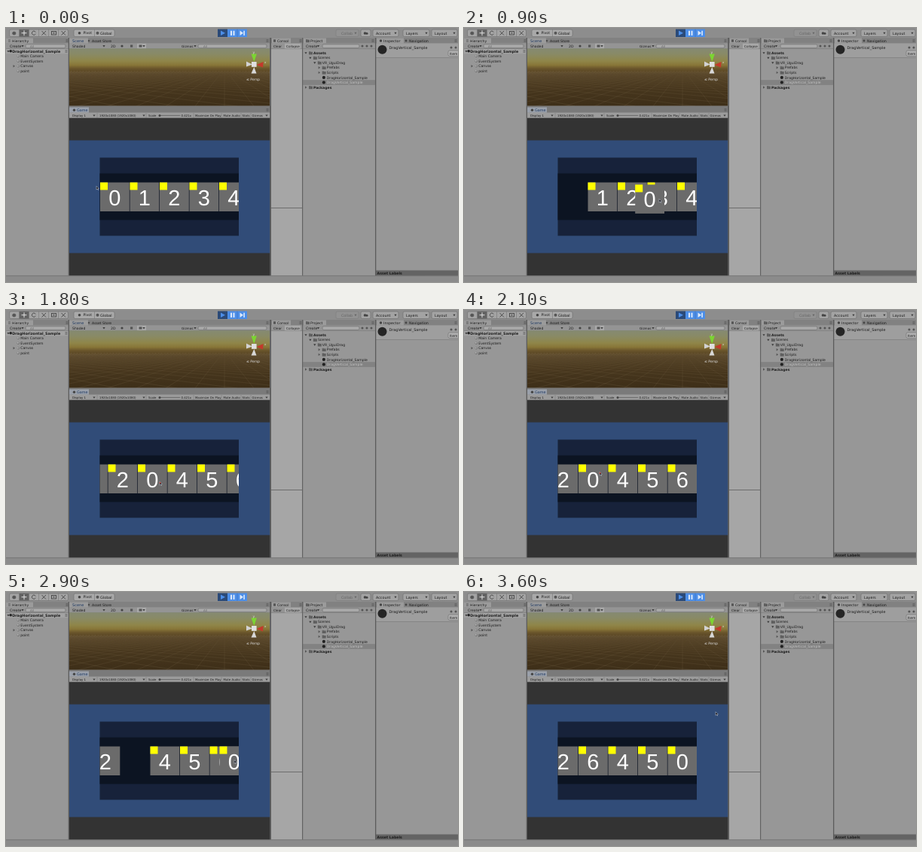
An HTML page with a canvas for the animation above (3700 ms loop, 600 by 338 pixels).

```html
<!DOCTYPE html>
<html lang="en">
<head>
<meta charset="utf-8">
<title>Drag and swap list</title>
<style>
html, body { margin: 0; width: 100%; height: 100%; overflow: hidden; background: #979797; }
canvas { display: block; }
</style>
</head>
<body>
<canvas id="stage" width="600" height="338"></canvas>
<script>
const ctx = document.getElementById('stage').getContext('2d');
const LOOP = 3700, STEP = 100;
const PITCH = 39.5, LEFT = 125, TOP = 205.5;
const INK = '#1c1c1c';

function box(x, y, w, h, color) {
  ctx.fillStyle = color;
  ctx.fillRect(x, y, w, h);
}

function text(s, x, y, { size = 4.6, bold = false, color = INK } = {}) {
  ctx.font = `${bold ? 'bold ' : ''}${size}px "DejaVu Sans", sans-serif`;
  ctx.textRendering = 'geometricPrecision';
  ctx.textAlign = 'left';
  ctx.fillStyle = color;
  ctx.fillText(s, x, y + size * 0.36);
}

function poly(points, color) {
  ctx.fillStyle = color;
  ctx.beginPath();
  points.forEach(([x, y]) => ctx.lineTo(x, y));
  ctx.closePath();
  ctx.fill();
}

function line(x1, y1, x2, y2, color, width = 0.7) {
  ctx.strokeStyle = color;
  ctx.lineWidth = width;
  ctx.beginPath();
  ctx.moveTo(x1, y1);
  ctx.lineTo(x2, y2);
  ctx.stroke();
}

function dot(x, y, r, color) {
  ctx.fillStyle = color;
  ctx.beginPath();
  ctx.arc(x, y, r, 0, 7);
  ctx.fill();
}

function pill(x, y, w, h, color, edge = '#6d6d6d', r = 2) {
  ctx.beginPath();
  ctx.roundRect(x, y, w, h, r);
  ctx.fillStyle = color;
  ctx.fill();
  ctx.strokeStyle = edge;
  ctx.lineWidth = 0.6;
  ctx.stroke();
}

function fade(y1, y2, stops) {
  const g = ctx.createLinearGradient(0, y1, 0, y2);
  stops.forEach(([p, c]) => g.addColorStop(p, c));
  return g;
}

const down = (x, y, color = '#3a3a3a') => poly([[x - 1.6, y - 1], [x + 1.6, y - 1], [x, y + 1.4]], color);
const right = (x, y) => poly([[x - 1, y - 1.7], [x + 1.5, y], [x - 1, y + 1.7]], '#555');

function menuIcon(x, y) {
  for (let i = -1; i < 2; i++) line(x - 1.5, y + i * 1.3, x + 1.5, y + i * 1.3, '#444', 0.5);
}

function folder(x, y) {
  box(x, y - 2, 2.5, 1, '#6b6b6b');
  box(x, y - 1.4, 5, 3.6, '#5f5f5f');
}

function toolbar() {
  box(0, 0, 600, 13, '#8d8d8d');
  pill(4.5, 2, 78, 9.5, '#a3a3a3');
  box(17.5, 2, 13, 9.5, '#626262');
  for (let i = 1; i < 6; i++) line(4.5 + i * 13, 2, 4.5 + i * 13, 11.5, '#777', 0.6);
  pill(8.5, 5, 4.5, 4, '#555', '#555');
  line(20.5, 6.7, 27.5, 6.7, '#eee', 0.9);
  line(24, 3.2, 24, 10.2, '#eee', 0.9);
  ctx.strokeStyle = '#444';
  ctx.lineWidth = 0.9;
  ctx.beginPath();
  ctx.arc(37, 6.7, 2.6, 0.5, 5.8);
  ctx.stroke();
  line(47.5, 4, 53, 9.5, '#444', 0.9);
  line(47.5, 9.5, 53, 4, '#444', 0.9);
  ctx.strokeRect(60.5, 4.5, 6, 4.5);
  dot(63.5, 6.7, 0.9, '#444');
  line(73.5, 4, 79, 9.5, '#444', 0.9);
  line(73.5, 9.5, 79, 4, '#444', 0.9);

  pill(90, 2, 54, 9.5, '#a9a9a9');
  line(117.5, 2, 117.5, 11.5, '#777', 0.6);
  dot(97.5, 6.7, 1.8, '#444');
  text('Pivot', 102.5, 6.8, { size: 4.7 });
  dot(121.5, 6.7, 2, '#555');
  text('Global', 125, 6.8, { size: 4.9 });

  const blue = '#4c8ee8', pale = '#dce9fb';
  box(281, 1.5, 13, 10.5, '#2b4a78');
  box(294, 1.5, 26, 10.5, blue);
  line(307, 1.5, 307, 12, '#3c6db4', 0.6);
  poly([[285, 3.5], [291, 6.7], [285, 9.9]], blue);
  box(298, 3.7, 2, 6.2, pale);
  box(301.5, 3.7, 2, 6.2, pale);
  poly([[310.5, 3.5], [315, 6.7], [310.5, 9.9]], pale);
  box(315.3, 3.7, 1.6, 6.2, pale);

  pill(438, 2, 30, 9.5, '#929292', '#7d7d7d');
  text('Collab', 445, 6.8, { size: 4.8, color: '#666' });
  down(464, 6.8, '#666');
  pill(471, 2, 13, 9.5, '#a3a3a3');
  dot(476.5, 7, 1.8, '#444');
  dot(479, 7.2, 1.5, '#444');
  [['Account', 487, 34], ['Layers', 527, 35], ['Layout', 565, 34]].forEach(([s, x, w]) => {
    pill(x, 2, w, 9.5, '#a3a3a3');
    text(s, x + 4, 6.8, { size: 4.8 });
    down(x + w - 4, 6.8);
  });
}

function panels() {
  box(0, 13, 600, 317, '#979797');
  box(352, 27, 41, 303, '#a6a6a6');
  box(0, 13, 600, 7.5, '#818181');
  [[0, 36], [84, 25], [353, 25], [395, 30], [492, 36]].forEach(([x, w]) => box(x, 13.5, w, 7, '#9b9b9b'));
  box(0, 20.5, 491, 7, '#949494');
  line(0, 27.6, 491, 27.6, '#777', 0.6);
  menuIcon(4.5, 17);
  text('Hierarchy', 8, 17);
  text('Scene', 88, 17, { size: 5, color: '#1f3a63' });
  text('Asset Store', 114, 17);
  text('Consol', 360, 17);
  text('Project', 404, 17, { size: 4.8 });
  text('Inspector', 501, 17, { size: 4.8 });
  text('Navigation', 535, 17, { size: 4.8 });
  dot(110, 17, 1.2, '#4b4b4b');
  box(355, 15.3, 3, 3.4, '#555');
  folder(398, 17);
  dot(497.5, 17, 1.7, '#444');
  dot(531, 17, 1.4, '#444');
  [81, 347, 391, 487, 597].forEach(x => menuIcon(x, 17));

  text('Create', 5, 24);
  down(22, 24.1);
  pill(26, 21.7, 53, 4.8, '#a9a9a9');
  text('All', 32, 24.1, { size: 4, color: '#666' });
  text('Shaded', 88, 24);
  down(130, 24.1);
  text('2D', 139, 24);
  dot(154, 24, 1.6, '#444');
  box(165, 22.4, 3.2, 3.2, '#555');
  box(174, 20.8, 12, 6.5, '#a9a9a9');
  box(176.5, 22.4, 4, 3.2, '#555');
  down(183, 24.1);
  text('Gizmos', 233, 24, { size: 4.2 });
  down(251, 24.1);
  pill(255, 21.7, 91, 4.8, '#a9a9a9');
  text('All', 262, 24.1, { size: 4, color: '#666' });
  text('Clear', 355, 24, { size: 4.2 });
  box(370, 20.8, 21, 6.5, '#a9a9a9');
  text('Collapse', 372, 24, { size: 4.2 });
  text('Create', 398, 24);
  down(414.5, 24.1);
  pill(420, 21.7, 49, 4.8, '#a9a9a9');
  [473, 479, 485].forEach(x => dot(x, 24, 1.5, '#555'));
}

function lists() {
  box(0, 28.2, 83, 6, '#a2a2a2');
  down(3, 31);
  dot(6.2, 30.8, 1.8, '#222');
  text('DragHorizontal_Sample', 8.2, 30.8, { size: 4.85, bold: true });
  menuIcon(80, 31);
  ['Main Camera', 'EventSystem', 'Canvas', 'point'].forEach((s, i) => {
    const y = 37.6 + i * 6.6;
    dot(16.3, y, 1.7, '#777');
    dot(15.9, y - 0.4, 1, '#b0b0b0');
    text(s, 19.3, y);
  });
  right(10.5, 50.8);

  box(394, 69.2, 96, 6.6, '#828282');
  [
    ['Assets', 0, 'open', true], ['Scenes', 1, 'open'], ['VR_UguiDrag', 2, 'open'],
    ['Prefabs', 3, 'closed'], ['Scripts', 3, 'closed'], ['DragHorizontal_Sample', 3],
    ['DragVertical_Sample', 3], ['Packages', 0, 'closed', true]
  ].forEach(([s, depth, state, bold], i) => {
    const x = 408 + depth * 5.9, y = 33.2 + i * 6.54;
    if (state === 'open') down(x - 10, y);
    if (state === 'closed') right(x - 10, y);
    if (state) folder(x - 6, y);
    else dot(x - 3.8, y, 2.1, '#222');
    text(s, x, y, { bold, color: i === 6 ? '#c4c4c4' : INK });
  });
  line(352, 239.5, 393, 239.5, '#666', 0.9);

  box(491, 20.5, 109, 19, '#9e9e9e');
  line(491, 39.5, 600, 39.5, '#777', 0.6);
  dot(499.5, 28.7, 6, '#252525');
  text('DragVertical_Sample', 508.5, 26, { size: 4.9 });
  dot(591, 26, 1.5, '#555');
  dot(597, 26, 1.5, '#555');
  pill(587, 30, 16, 7.5, '#b0b0b0');
  text('Item', 589, 34);
  box(491, 322.5, 109, 7.5, '#646464');
  text('Asset Labels', 492.5, 326.5, { size: 4.7, bold: true });
}

// Ground lines of one direction all leave the same point on the horizon
function groundFan(x, spread, color) {
  for (let i = -110; i <= 110; i++) line(x, 54, x + i * spread * 50, 104, color, 0.5);
}

function sceneView() {
  ctx.save();
  ctx.beginPath();
  ctx.rect(84, 27.2, 266, 76.5);
  ctx.clip();
  box(84, 27, 266, 77, fade(27, 104, [
    [0, '#858a72'], [0.1, '#898a66'], [0.22, '#8f8649'], [0.29, '#887638'],
    [0.35, '#6a552b'], [0.44, '#503e22'], [1, '#3d2e18']
  ]));
  const grid = fade(56, 104, [[0, 'rgba(190,170,135,0)'], [0.3, 'rgba(190,170,135,.1)'], [1, 'rgba(190,170,135,.2)']]);
  groundFan(290, 0.78, grid);
  groundFan(-93, 1.6, grid);
  ctx.restore();

  poly([[319, 44.5], [319, 51.5], [327, 48.5]], '#d2d2d2');
  poly([[325.5, 60.5], [332.5, 60.5], [329.3, 52]], '#d8d8d8');
  poly([[325.5, 34.5], [332.8, 34.5], [329.3, 45]], '#7bd531');
  poly([[341.5, 45], [341, 52.5], [332.5, 49]], '#c3392b');
  box(326, 45, 6.6, 6.8, '#e0e0e0');
  text('y', 327.5, 32.5, { color: '#ddd' });
  text('x', 343, 46, { size: 4, color: '#ddd' });
  text('≤ Persp', 319, 68.5, { color: '#ddd' });
}

function gameChrome() {
  box(84, 103.7, 267, 9, '#7a7a7a');
  box(84, 105.5, 26, 7.2, '#9aa0aa');
  dot(90.5, 109.3, 1.7, '#444');
  text('Game', 94, 109.4, { size: 4.9, color: '#1f3a63' });
  menuIcon(347, 109);
  box(84, 112.7, 267, 7, '#9c9c9c');
  [['Display 1', 88], ['1920x1080 (1920x1080)', 124], ['Scale', 189], ['0.421x', 232.5],
   ['Maximize On Play', 251], ['Mute Audio', 288.5], ['Stats', 313.5], ['Gizmos', 326.5]]
    .forEach(([s, x]) => text(s, x, 116.4, { size: 3.9 }));
  [117, 183, 346].forEach(x => down(x, 116.4));
  line(203, 116.4, 231, 116.4, '#555', 0.7);
  dot(204, 116.4, 1.5, '#444');
  [121, 186, 249, 286, 312, 325].forEach(x => line(x, 113, x, 119.7, '#7b7b7b', 0.5));

  box(84, 119.7, 267, 210.3, '#333333');
  box(84, 149.5, 267, 150, '#314c78');
  box(124.5, 172.5, 184.5, 104, '#17223a');
  box(124.5, 193.5, 184.5, 62, '#0c1422');
}

function frameLines() {
  box(82.7, 13, 1.3, 317, '#5c5c5c');
  box(350.2, 13, 1.8, 317, '#5c5c5c');
  box(393, 13, 1.2, 317, '#636363');
  box(490, 13, 1.3, 317, '#5c5c5c');
  box(0, 329.5, 600, 8.5, '#8b8b8b');
  line(0, 329.8, 600, 329.8, '#666', 0.6);
}

// Linear track of [time, ...values]
function track(keys, t) {
  const i = keys.findIndex(k => k[0] > t);
  if (i === 0) return keys[0].slice(1);
  if (i < 0) return keys[keys.length - 1].slice(1);
  const a = keys[i - 1], b = keys[i], p = (t - a[0]) / (b[0] - a[0]);
  return a.slice(1).map((v, n) => v + (b[n + 1] - v) * p);
}

const pointerPath = [
  [0, 121, 212], [200, 146, 224], [500, 202, 237], [900, 260, 229], [1200, 262, 226],
  [1300, 262, 226], [1800, 205, 230], [2100, 181, 217], [2300, 173, 222],
  [2900, 304, 225], [3000, 304, 225], [3600, 335, 161]
];
const scrollPath = [[1300, 0], [1800, 68.5], [2000, 91.5]];
const drags = [
  { from: 200, to: 1200, path: [[200, LEFT, TOP], [500, 162, 212], [1000, 243.5, 207.5], [1200, 243.5, TOP]] },
  { from: 2300, to: 3000, path: [[2300, 152.5, TOP], [2900, 283.5, TOP]] }
];

function orderAt(t) {
  if (t < 1200) return [0, 1, 2, 3, 4, 5, 6];
  if (t < 3000) return [3, 1, 2, 0, 4, 5, 6];
  return [3, 1, 2, 6, 4, 5, 0];
}

function tile(n, x, y) {
  box(x, y, 38.8, 38.5, '#6b6b6b');
  ctx.font = '29px "Liberation Sans", Arial, sans-serif';
  ctx.textAlign = 'center';
  ctx.fillStyle = '#fff';
  ctx.fillText(n, x + 19.4, y + 30);
  box(x, y, 10, 10, '#ffff00');
}

function list(t) {
  const drag = drags.find(d => t > d.from && t < d.to);
  const [scroll] = track(scrollPath, t);
  ctx.save();
  ctx.beginPath();
  ctx.rect(124.5, 172.5, 184.5, 104);
  ctx.clip();
  orderAt(t).forEach((n, i) => {
    if (!drag || n !== 0) tile(n, LEFT + i * PITCH - scroll, TOP);
  });
  if (drag) tile(0, ...track(drag.path, t));
  ctx.restore();
}

function pointer(t) {
  const [x, y] = track(pointerPath, t);
  ctx.save();
  ctx.translate(x - 0.7, y - 1);
  poly([[-0.6, -1], [-0.6, 4.6], [1, 3.5], [2, 5], [2.8, 4.5], [2.1, 3], [3.6, 2.8]], '#a9b0bd');
  poly([[0, 0.2], [0, 3.6], [1.1, 2.7], [2, 4.1], [1.6, 2.5], [2.6, 2.3]], '#15151a');
  if (t > 1300 && t < 2300) dot(0.3, 1, 1.1, '#b8443c');
  ctx.restore();
}

function draw(now) {
  const t = Math.floor((now % LOOP) / STEP) * STEP;
  panels();
  toolbar();
  lists();
  sceneView();
  gameChrome();
  list(t);
  frameLines();
  pointer(t);
}

let start;
function tick(now) {
  start ??= now;
  draw(now - start);
  requestAnimationFrame(tick);
}
requestAnimationFrame(tick);
</script>
</body>
</html>
```
